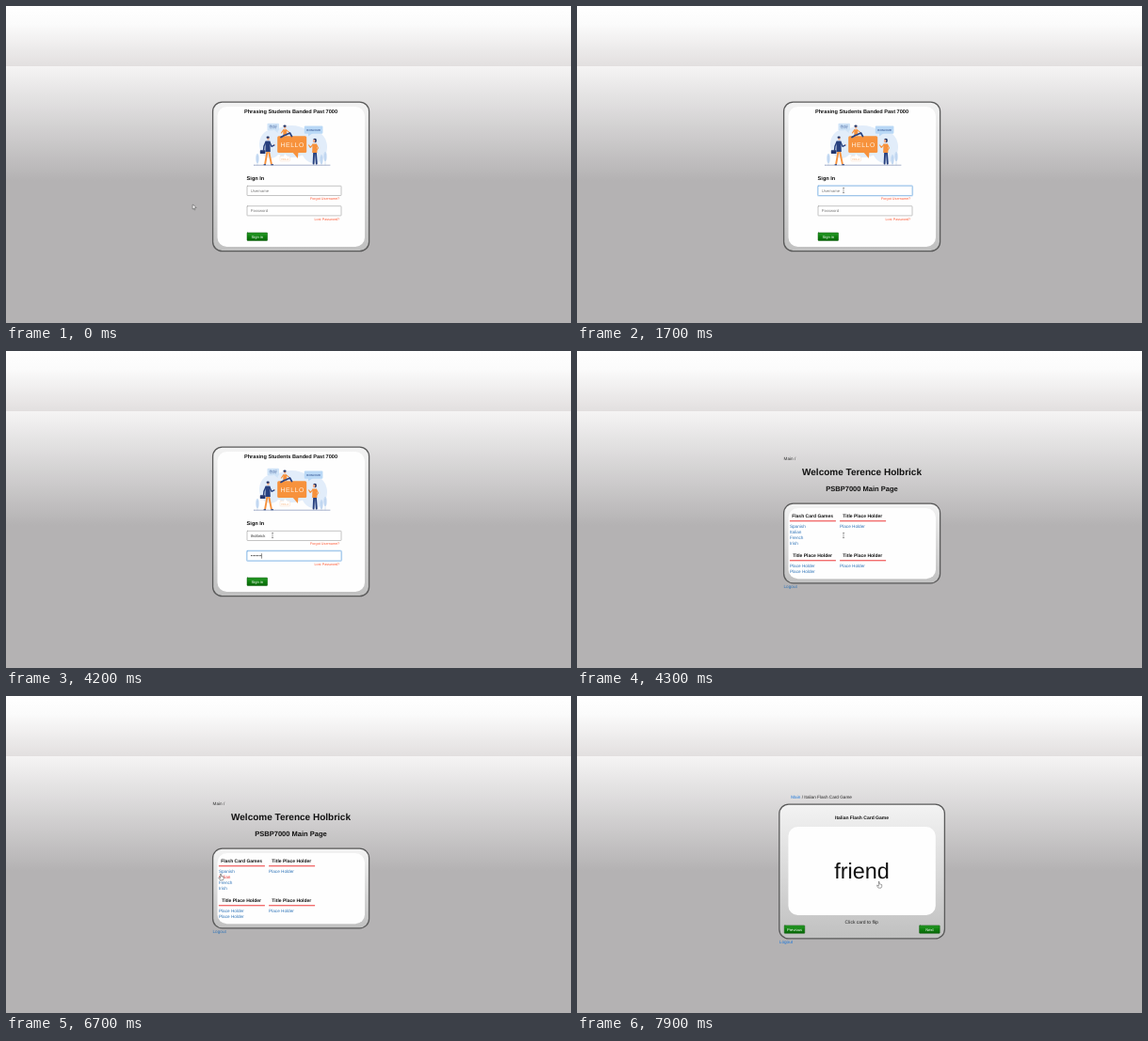
These frames come from a looping animation (600x337 px, 8000 ms). An HTML page with a canvas:

```html
<!DOCTYPE html>
<html lang="en">
<head>
<meta charset="utf-8">
<title>Flash cards</title>
<style>
html, body { margin: 0; width: 100%; height: 100%; overflow: hidden; background: #b4b2b3; }
canvas { display: block; width: 600px; height: 337px; }
</style>
</head>
<body>
<canvas id="stage"></canvas>
<script>
const W = 600, H = 337, LOOP = 8000, PX = 0.3125; // PX: page pixels to stage pixels
const SIGNED_IN = 4300, OPEN_GAME = 6800, FLIP = 7900;
const USER = 'tholbrick', FULL_NAME = 'Terence Holbrick';
const SITE = 'Phrasing Students Banded Past 7000', SHORT = 'PSBP7000';
const LINK = '#2f74b8', BRIGHT = '#1c78dc', NAVY = '#27407f', ORANGE = '#f7923c', SKIN = '#f3b08d';

const canvas = document.getElementById('stage');
const ctx = canvas.getContext('2d');
const dpr = window.devicePixelRatio || 1;
canvas.width = W * dpr;
canvas.height = H * dpr;
ctx.scale(dpr, dpr);
if ('textRendering' in ctx) ctx.textRendering = 'geometricPrecision';

function text(str, x, y, size, { color = '#111', bold = false, align = 'left' } = {}) {
  ctx.font = `${bold ? 'bold ' : ''}${size * PX}px "Liberation Sans", Arial, sans-serif`;
  ctx.textAlign = align;
  ctx.fillStyle = color;
  ctx.fillText(str, x, y);
}

function heading(str, x, y, size) {
  text(str, x, y, size, { bold: true, align: 'center' });
}

function vGradient(y0, y1, ...stops) {
  const g = ctx.createLinearGradient(0, y0, 0, y1);
  stops.forEach(([at, color]) => g.addColorStop(at, color));
  return g;
}

function box(x, y, w, h, r, fill, stroke, line = 1) {
  ctx.beginPath();
  ctx.roundRect(x, y, w, h, r);
  if (fill) { ctx.fillStyle = fill; ctx.fill(); }
  if (stroke) { ctx.strokeStyle = stroke; ctx.lineWidth = line; ctx.stroke(); }
}

function trace(p) {
  ctx.beginPath();
  for (let i = 0; i < p.length; i += 2) ctx.lineTo(p[i], p[i + 1]);
}

function poly(color, ...p) {
  trace(p);
  ctx.fillStyle = color;
  ctx.fill();
}

function stroke(color, width, ...p) {
  trace(p);
  ctx.strokeStyle = color;
  ctx.lineWidth = width;
  ctx.lineCap = ctx.lineJoin = 'round';
  ctx.stroke();
}

function oval(color, x, y, rx, ry = rx) {
  ctx.fillStyle = color;
  ctx.beginPath();
  ctx.ellipse(x, y, rx, ry, 0, 0, 7);
  ctx.fill();
}

function background() {
  ctx.fillStyle = vGradient(0, 64, [0, '#fff'], [0.3, '#fbfbfb'], [1, '#e2dfdf']);
  ctx.fillRect(0, 0, W, 64);
  ctx.fillStyle = vGradient(64, 186, [0, '#f5f4f4'], [1, '#b4b2b3']);
  ctx.fillRect(0, 64, W, H - 64);
}

function panel(x, y, w, h) {
  box(x, y, w, h, 10, vGradient(y, y + h, [0, '#f3f3f3'], [1, '#c0c0c0']), '#5a5a5a', 1.3);
}

function button(label, x, y, w, h) {
  box(x, y, w, h, 0.6, vGradient(y, y + h, [0, '#2a9a2a'], [0.5, '#0f820f'], [1, '#086408']), '#0b5c0b', 0.5);
  text(label, x + w / 2, y + h / 2 + 1.4, 13.33, { color: '#fff', align: 'center' });
}

function field(y, value, placeholder, focus, caret) {
  if (focus > 0) {
    ctx.globalAlpha = focus;
    box(255.6, y - 0.4, 100.8, 11, 1, null, '#c9e0f6', 1.4);
    ctx.globalAlpha = 1;
  }
  box(256, y, 100, 10.2, 0.5, '#fff', focus > 0.5 ? '#78aee0' : '#a6a6a6', 0.65);
  const empty = value === '';
  text(empty ? placeholder : value, 259.8, y + 6.7, 13.33, { color: empty ? '#777' : '#333' });
  if (caret) {
    const x = 259.9 + (empty ? 0 : ctx.measureText(value).width);
    stroke('#222', 0.5, x, y + 2.8, x, y + 7.6);
  }
}

function walker() {
  stroke(ORANGE, 1.9, 277.6, 154, 275.2, 167.6);
  stroke(ORANGE, 1.9, 279, 154, 281.8, 167.6);
  stroke(NAVY, 1, 273.8, 168.7, 275.6, 168.7);
  stroke(NAVY, 1, 281.6, 168.7, 283.6, 168.7);
  poly(NAVY, 275.6, 143.5, 280.4, 143.5, 280.8, 155, 275.4, 155);
  stroke(NAVY, 1.5, 276, 144.6, 274, 149, 273.6, 153);
  stroke(NAVY, 1.3, 280, 144.8, 282, 149.3, 285, 147.8);
  oval(SKIN, 285.6, 147.3, 0.6);
  oval(SKIN, 278.4, 140.9, 1.3, 1.8);
  oval('#1f3063', 278.1, 139.7, 1.6, 1.1);
  box(269.8, 153.3, 5.6, 3.8, 0.5, '#25376e');
}

function sitter() {
  poly(ORANGE, 294.3, 131.2, 298, 131.2, 298.3, 137.5, 294.3, 137.5);
  stroke(ORANGE, 1.1, 297.7, 131.9, 300.4, 134.2);
  stroke(ORANGE, 1.1, 294.6, 131.9, 292.4, 135);
  stroke(NAVY, 1.7, 297, 137, 301.5, 135, 303.5, 138.6);
  stroke(NAVY, 1.7, 296, 137.3, 292, 139.6);
  oval(SKIN, 296.2, 128.9, 1.2, 1.6);
  oval('#1f3063', 296, 127.7, 1.6, 1.1);
}

function speaker() {
  stroke(NAVY, 1.9, 327.2, 154, 326.6, 167.6);
  stroke(NAVY, 1.9, 328.8, 154, 329.8, 167.6);
  poly(ORANGE, 325.4, 146.4, 329.9, 146.4, 330.4, 156, 325.2, 156);
  stroke(ORANGE, 1.2, 325.9, 147.3, 323.2, 150.4, 321.6, 148);
  stroke(ORANGE, 1.2, 329.6, 147.3, 331.4, 151, 329.6, 153.6);
  oval('#1f3063', 328, 143, 1.9, 2.3);
  oval(SKIN, 327.1, 143.5, 1.2, 1.7);
}

function illustration() {
  oval('#e2edfa', 281, 147, 12, 15);
  oval('#e2edfa', 303, 144, 23, 17);
  oval('#e2edfa', 327, 150, 14, 17);
  [[267, 162], [339, 160], [335, 163]].forEach(([x, y]) => {
    oval('#c9ddf4', x, y, 1.7, 5);
    stroke('#a3c1e4', 0.4, x, y - 3, x, 169);
  });
  stroke('#6d7fa8', 0.6, 263, 169.2, 344, 169.2);

  box(277.5, 124.8, 12.5, 7.8, 1, '#cfe3f7');
  poly('#cfe3f7', 285, 132, 289, 132, 288.5, 135);
  ctx.font = '4.2px "Noto Sans CJK SC", "Noto Sans CJK", sans-serif';
  ctx.textAlign = 'center';
  ctx.fillStyle = '#4a6aa3';
  ctx.fillText('你好', 283.7, 130.3);

  box(316.8, 127.6, 19.6, 8.2, 1, '#b9d8f6');
  poly('#b9d8f6', 321, 135, 326, 135, 321, 138.6);
  text('BONJOUR', 326.6, 132.9, 9.4, { color: '#4a6aa3', bold: true, align: 'center' });

  box(288.2, 138.3, 31, 17.8, 1.5, ORANGE);
  poly(ORANGE, 304, 155, 310.5, 155, 309.8, 162);
  ctx.letterSpacing = '0.6px';
  text('HELLO', 304.2, 150.2, 22, { color: '#fff3e4', align: 'center' });
  ctx.letterSpacing = '0px';

  box(291, 159.4, 10.5, 5.6, 1, '#fff', '#f6d6bd', 0.4);
  poly('#fff', 296, 157, 299, 160, 295, 160);
  text('HOLA', 296.2, 163.5, 9.5, { color: '#f9b27a', align: 'center' });

  walker();
  sitter();
  speaker();
}

function loginPage(t) {
  panel(219.6, 102.1, 166, 158.6);
  box(224.5, 107, 156.5, 149, 10, '#fefefe');
  heading(SITE, 302.5, 113.7, 18);
  illustration();
  text('Sign In', 255.6, 185, 18, { bold: true });

  const onPassword = t >= 3100;
  const typed = t < 2000 ? 0 : t < 2200 ? 1 : Math.min(USER.length, 2 + (t - 2200) / 100);
  const bullets = t < 3300 ? 0 : Math.min(8, 1 + (t - 3300) / 100);
  const fade = start => t < start ? 0 : t < start + 100 ? 0.5 : 1;

  field(191.3, USER.slice(0, typed), 'Username', onPassword ? 0 : fade(1100),
    t >= 1200 && !onPassword && !(t >= 1700 && t < 2000));
  field(212.7, '•'.repeat(bullets), 'Password', fade(3100), onPassword);

  const hint = { color: '#ff5a36', align: 'right' };
  text('Forgot Username?', 354.2, 206, 12, hint);
  text('Lost Password?', 354.2, 227.6, 12, hint);
  button('Sign in', 256, 241, 21.6, 8.4);
}

function tile(title, cx, y, links, hot = -1) {
  const left = cx - 24.2;
  heading(title, cx, y, 16);
  ctx.fillStyle = '#ee4a4a';
  ctx.fillRect(left, y + 3.2, 49, 1.1);
  links.forEach((label, i) =>
    text(label, left, y + 10.7 + i * 6.25, 15, { color: i === hot ? '#e8302c' : LINK }));
}

function mainPage(t) {
  text('Main /', 219.5, 115.6, 15, { color: '#333' });
  heading('Welcome ' + FULL_NAME, 302.5, 132.4, 32);
  heading(SHORT + ' Main Page', 302.5, 148.5, 24);
  panel(219.6, 162.2, 166, 84.6);
  box(224.5, 167, 156.5, 75.3, 10, '#fefefe');
  tile('Flash Card Games', 250.1, 177, ['Spanish', 'Italian', 'French', 'Irish'], t >= 5400 ? 1 : -1);
  tile('Title Place Holder', 303.3, 177, ['Place Holder']);
  tile('Title Place Holder', 250.1, 219, ['Place Holder', 'Place Holder']);
  tile('Title Place Holder', 303.3, 219, ['Place Holder']);
  text('Logout', 219.5, 251.8, 15, { color: LINK });
}

function cardPage(t) {
  text('Main', 227.2, 108.7, 15, { color: BRIGHT });
  text(' / Italian Flash Card Game', 237.4, 108.7, 15, { color: '#222' });
  panel(214.8, 115.1, 175.6, 142.8);
  heading('Italian Flash Card Game', 302.5, 131.2, 16);
  box(224.4, 139, 156.4, 94, 10, '#fefefe');
  text(t < FLIP ? 'amico' : 'friend', 302.5, 194, 75, { align: 'center' });
  text('Click card to flip', 302.2, 241.9, 16, { align: 'center', color: '#222' });
  button('Previous', 220.2, 243.9, 21.6, 8.4);
  button('Next', 363.6, 243.9, 21.6, 8.4);
  text('Logout', 214.8, 263, 15, { color: BRIGHT });
}

function outlined(...p) {
  trace(p);
  ctx.closePath();
  ctx.fillStyle = '#fff';
  ctx.fill();
  ctx.strokeStyle = '#444';
  ctx.lineWidth = 0.5;
  ctx.stroke();
}

// Each cursor is drawn around its hot spot.
const cursors = {
  arrow() {
    outlined(0, 0, 0, 5, 1.2, 4, 2, 5.9, 2.8, 5.5, 2, 3.7, 3.5, 3.6);
  },
  beam() {
    stroke('#555', 0.45, 0, -2.6, 0, 2.6);
    stroke('#555', 0.45, -0.8, -2.6, 0.8, -2.6);
    stroke('#555', 0.45, -0.8, 2.6, 0.8, 2.6);
  },
  hand() {
    outlined(-0.6, 0, 0.5, 0, 0.6, 2.3, 3, 2.9, 3.2, 4.6, 2.4, 6.5,
      -0.5, 6.5, -2.3, 3.9, -1.7, 3.4, -0.6, 4.3);
  }
};

const progress = (t, from, to) => Math.max(0, Math.min(1, (t - from) / (to - from)));
const ease = p => p * p * (3 - 2 * p);
const mix = (a, b, p) => a + (b - a) * p;

function pointer(t) {
  if (t < 5000) {
    const p = ease(progress(t, 0, 600));
    const x = mix(198.2, 283, p), y = 211 + 25 * p - 40 * p * p;
    return [x > 256 && y < 201.5 ? 'beam' : 'arrow', x, y];
  }
  if (t < OPEN_GAME) {
    const p = ease(progress(t, 4900, 5400));
    return [p < 1 ? 'arrow' : 'hand', mix(283, 228, p), mix(196, 189.3, p)];
  }
  const p = ease(progress(t, 7300, 7700));
  return ['hand', mix(224.8, 320.6, p), mix(189, 197.6, p)];
}

function draw(t) {
  background();
  (t < SIGNED_IN ? loginPage : t < OPEN_GAME ? mainPage : cardPage)(t);
  const [kind, x, y] = pointer(t);
  ctx.save();
  ctx.translate(x, y);
  cursors[kind]();
  ctx.restore();
}

const start = performance.now();
function tick() {
  const t = (performance.now() - start) % LOOP;
  draw(Math.floor(t / 100) * 100);
  requestAnimationFrame(tick);
}
tick();
</script>
</body>
</html>
```
